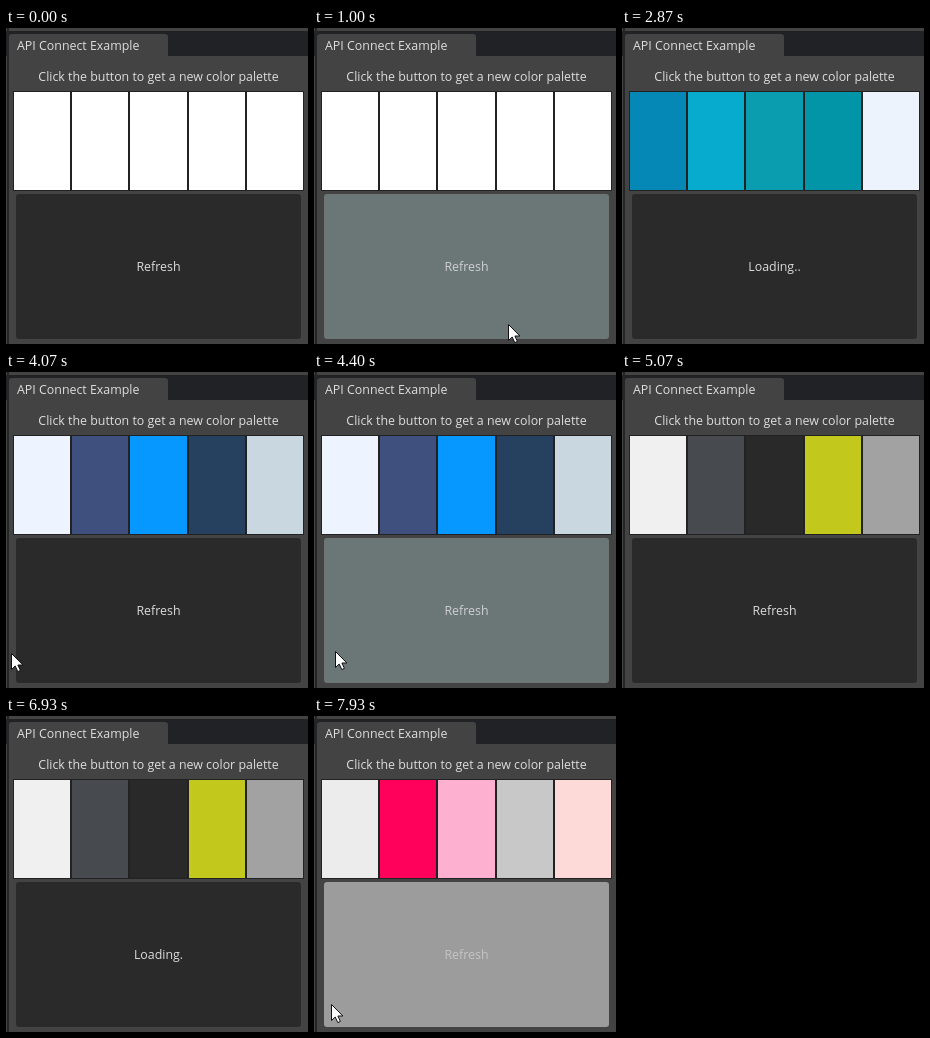
An HTML page that plays this animation: 302x316 px, repeating every 8 s.

```html
<!DOCTYPE html>
<html lang="en">
<head>
<meta charset="utf-8">
<title>Color palette panel</title>
<style>
  html, body { margin: 0; width: 100%; height: 100%; overflow: hidden; background: #434343; }
  svg { display: block; width: 302px; height: 316px; }
  text { font: 500 12.4px "Open Sans", "Noto Sans", sans-serif; fill: #dedede; }
  .mid { text-anchor: middle; }
</style>
</head>
<body>
<svg viewBox="0 0 302 316">
  <rect width="302" height="316" fill="#434343"/>
  <rect y="3" width="302" height="25" fill="#202226"/>
  <rect id="edge" x="1" width="2" height="316" fill="#242527"/>
  <path d="M3 28V9q0-3 3-3H159q3 0 3 3V28z" fill="#434343"/>
  <text x="11" y="22">API Connect Example</text>
  <text class="mid" x="152.5" y="53">Click the button to get a new color palette</text>
  <rect x="7" y="63" width="291" height="100" fill="#222"/>
  <g id="swatches"></g>
  <rect id="button" x="10" y="166" width="285" height="145" rx="3"/>
  <text id="label" class="mid" x="152.5" y="243"></text>
  <path id="cursor" d="M.5 .5V16.5L4.2 13L6.8 18.6L9.4 17.4L6.9 12H11.9z" fill="#fff" stroke="#111" stroke-width="1"/>
</svg>
<script>
const LOOP = 8000;
const FPS = 15;
const $ = id => document.getElementById(id);

const FILL = { idle: '#2a2a2a', hover: '#6b7676', press: '#9c9c9c' };
const TEXT = { idle: '#dcdcdc', hover: '#cfd1d1', press: '#c4c4c4' };
const WHITE = Array(5).fill('#fff');
const OCEAN = ['#0588b5', '#07abce', '#0a9daf', '#0295a8', '#edf3fd'];
const NIGHT = ['#edf4ff', '#3f507f', '#0697ff', '#26405f', '#c8d7e0'];
const LIME = ['#f0f0f0', '#474b50', '#292929', '#c3c81d', '#a2a2a2'];
const ROSE = ['#ececec', '#ff005a', '#fdb0cf', '#c8c8c8', '#fdd9d8'];

const steps = [];
let palette = WHITE;

function add(tick, state) {
  const at = Math.round(tick * 100 / FPS) * 10;
  steps.push({ at, mode: 'idle', label: 'Refresh', palette, ...state });
}
function point(tick, mode, x, y, edge = false) {
  add(tick, { mode, edge, pos: [x, y] });
}
// Waiting dots cycle until the new colors arrive.
function load(ticks, done, colors) {
  ticks.forEach((tick, i) => add(tick, { label: 'Loading' + '.'.repeat(i % 4) }));
  palette = colors;
  add(done, {});
}

add(0, {});
point(6, 'hover', 202, 300);
point(7, 'hover', 195, 297);
point(15, 'hover', 194, 296);
point(16, 'press', 194, 296);
load([17, 18, 19, 20, 21], 22, OCEAN);

point(37, 'idle', 8, 273, true);
point(38, 'hover', 17, 276);
point(40, 'press', 17, 276);
load([41, 42, 43, 44, 46, 47], 48, NIGHT);

point(61, 'idle', 5, 281);
point(62, 'hover', 14, 279);
point(63, 'hover', 20, 279);
point(66, 'hover', 21, 279);
point(67, 'press', 21, 279);
load([69, 70, 71, 72, 73, 74, 75], 76, LIME);

point(92, 'idle', 3, 278);
point(93, 'hover', 12, 279);
point(94, 'hover', 22, 280);
point(95, 'hover', 28, 280);
point(96, 'hover', 30, 280);
point(97, 'press', 30, 280);
load([99, 100, 101, 102, 103, 104], 105, ROSE);

point(114, 'idle', 1, 283);
point(115, 'idle', 8, 286);
point(116, 'hover', 14, 288);
point(117, 'hover', 17, 288);
point(119, 'press', 17, 288);

const swatches = WHITE.map((_, i) => {
  const rect = document.createElementNS('http://www.w3.org/2000/svg', 'rect');
  const x = Math.round(8 + i * 58.2);
  const attrs = { x, y: 64, width: Math.round(64.2 + i * 58.2) - x, height: 98 };
  for (const key in attrs) rect.setAttribute(key, attrs[key]);
  return $('swatches').appendChild(rect);
});

let shown;
function draw(time) {
  const t = time % LOOP;
  const step = steps.findLast(s => s.at <= t);
  if (step === shown) return;
  shown = step;
  swatches.forEach((rect, i) => rect.setAttribute('fill', step.palette[i]));
  $('button').setAttribute('fill', FILL[step.mode]);
  $('label').style.fill = TEXT[step.mode];
  $('label').textContent = step.label;
  $('edge').setAttribute('fill', step.edge ? '#3f74b5' : '#242527');
  $('cursor').setAttribute('visibility', step.pos ? 'visible' : 'hidden');
  if (step.pos) $('cursor').setAttribute('transform', `translate(${step.pos})`);
}

const start = performance.now();
function tick() {
  draw(performance.now() - start);
  requestAnimationFrame(tick);
}
tick();
</script>
</body>
</html>
```
